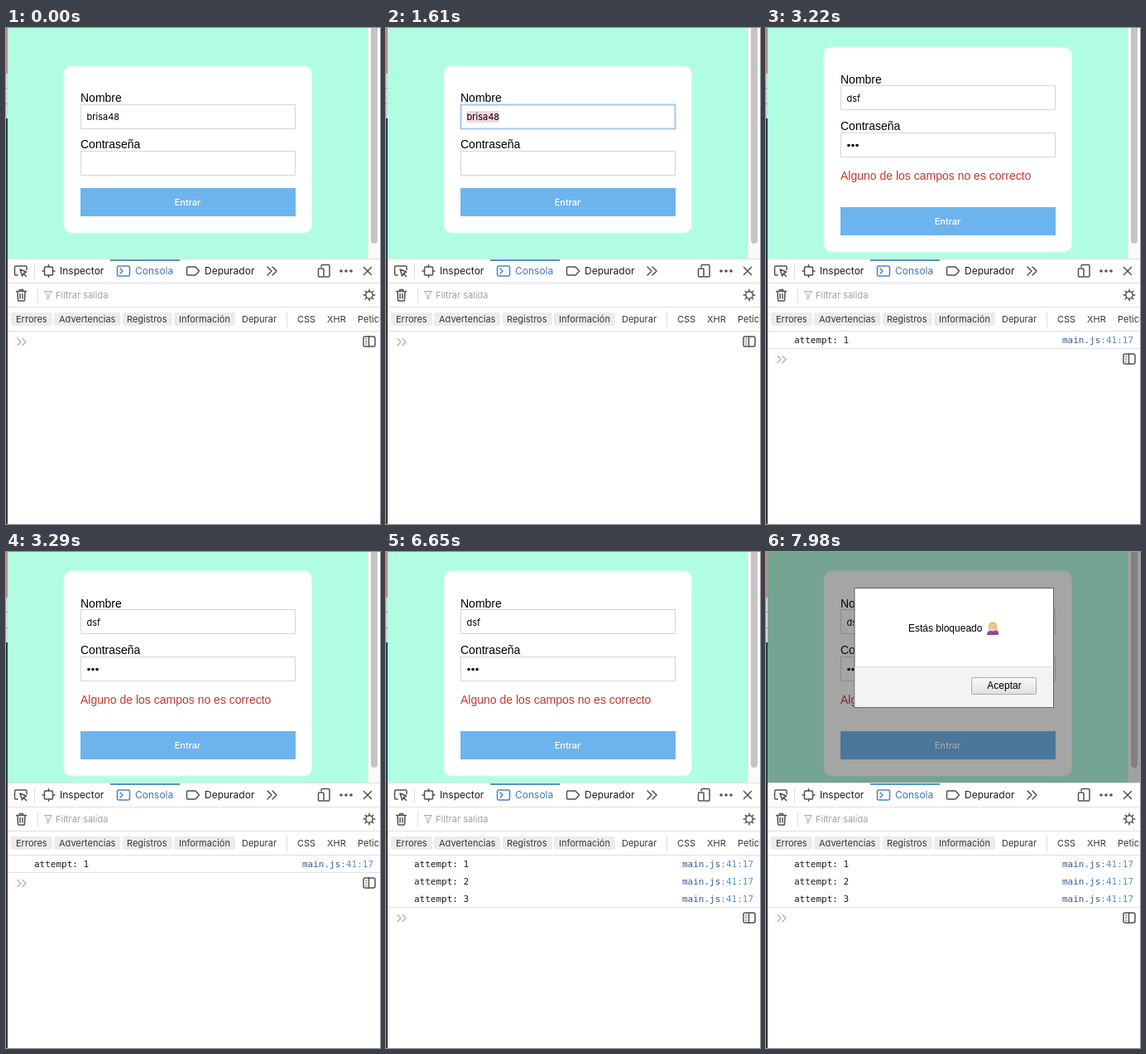
An HTML page that plays this animation: 452x598 px, repeating every 8 s.

```html
<!DOCTYPE html>
<html lang="es">
<head>
<meta charset="utf-8">
<title>Acceso</title>
<style>
  html, body { margin: 0; width: 100%; height: 100%; overflow: hidden; background: #fff; }
  svg { display: block; width: 100vw; height: 100vh; }
  text { white-space: pre; }
  .page { font: 14px "Liberation Sans", Arial, sans-serif; }
  .field { font: 11px Inter, sans-serif; }
  .tab { font: 12px Inter, sans-serif; fill: #1c1c1f; }
  .small { font: 11px Inter, sans-serif; fill: #38383d; }
  .log { font: 11px "DejaVu Sans Mono", monospace; fill: #1c1c1f; }
  .alert { font: 12px "Liberation Sans", Arial, sans-serif; }
  .icon { fill: none; stroke: #505055; stroke-width: 1.5; stroke-linecap: round; stroke-linejoin: round; }
  .rule { fill: #e0e0e2; }
  .input { fill: #fff; stroke: #d6d6d6; }
  .ring { fill: none; stroke: #a6c8ef; stroke-width: 2; }
</style>
</head>
<body>
<svg viewBox="0 0 452 598" preserveAspectRatio="none">
  <defs>
    <linearGradient id="key" x2="0" y2="1">
      <stop stop-color="#fafafa"/><stop offset="1" stop-color="#dedede"/>
    </linearGradient>
  </defs>
  <rect width="452" height="598" fill="#fff"/>

  <!-- login page -->
  <rect width="438" height="278" fill="#b1fde2"/>
  <rect x="437" width="15" height="278" fill="#fafafa"/>
  <rect x="437" width="1" height="278" fill="#e6e6e6"/>
  <rect x="441" y="-8" width="8" height="268" rx="4" fill="#c4c4c4"/>

  <rect id="card" x="70" y="46" width="299.5" height="201" rx="9" fill="#fff" stroke="#d9fbef"/>
  <g id="nameBox">
    <rect class="input" x="90.5" y="92.5" width="259" height="29"/>
    <rect id="nameRing" class="ring" x="90.5" y="92.5" width="259" height="29"/>
  </g>
  <g id="fields">
    <text class="page" x="90" y="89">Nombre</text>
    <rect id="mark" x="97.5" y="100" width="39" height="14" fill="#f7d5e4"/>
    <text id="name" class="field" x="97.5" y="111"></text>
    <text class="page" x="90" y="145">Contraseña</text>
    <rect class="input" x="90.5" y="148.5" width="259" height="29"/>
    <rect id="passRing" class="ring" x="90.5" y="148.5" width="259" height="29"/>
    <g id="dots">
      <circle cx="100" cy="163.5" r="1.8"/>
      <circle cx="105" cy="163.5" r="1.8"/>
      <circle cx="110" cy="163.5" r="1.8"/>
    </g>
    <rect id="caret" width="1" height="14"/>
  </g>
  <text id="error" class="page" x="90" y="183" fill="#c5362c">Alguno de los campos no es correcto</text>
  <g id="button">
    <rect x="90" y="193" width="260" height="34" fill="#6db4ef"/>
    <text class="field" x="219.5" y="214" text-anchor="middle" font-weight="500" style="font-weight:500" fill="#fff">Entrar</text>
  </g>

  <!-- modal alert -->
  <g id="alert">
    <rect width="452" height="278" fill="#141414" fill-opacity=".38"/>
    <rect x="107" y="43.5" width="240.5" height="144" fill="#fff" stroke="#5f6864"/>
    <rect x="107.5" y="138" width="239.5" height="49" fill="#f3f3f3"/>
    <rect x="107.5" y="138" width="239.5" height="1" fill="#dedede"/>
    <text class="alert" x="172" y="96">Estás bloqueado</text>
    <g transform="translate(266 84)">
      <path d="M1 16q0-5 5-5.500h4q5 .5 5 5.500z" fill="#8a4a9c"/>
      <path d="M3 10q-1.500-9.500 5-9.500t5 9.500z" fill="#e6bd4e"/>
      <ellipse cx="8" cy="7" rx="3.600" ry="4.500" fill="#f3cfa9"/>
      <path d="M4 4.500q4-3 8 0l-1-3.500H5z" fill="#e6bd4e"/>
      <path d="M13.500 14.500l-2-7-5-1.500" fill="none" stroke="#e5b58a" stroke-width="2" stroke-linecap="round"/>
      <path d="M13.800 15l-1.300-4" stroke="#8a4a9c" stroke-width="3"/>
    </g>
    <rect x="248.500" y="151.500" width="78" height="20" rx="1" fill="url(#key)" stroke="#ababab"/>
    <text class="alert" x="288" y="165" text-anchor="middle">Aceptar</text>
  </g>

  <!-- developer tools -->
  <rect y="278" width="452" height="320" fill="#fff"/>
  <rect class="rule" y="278" width="452" height="1"/>
  <rect class="rule" y="307" width="452" height="1"/>
  <rect class="rule" y="336" width="452" height="1"/>
  <rect class="rule" y="365" width="452" height="1"/>
  <rect class="rule" x="34" y="284" width="1" height="19"/>
  <rect class="rule" x="38" y="313" width="1" height="19"/>
  <rect class="rule" x="339" y="342" width="1" height="19"/>
  <rect x="126" y="279" width="84" height="2" fill="#5c8fc7"/>

  <g class="icon">
    <path d="M14 298h-2q-1.500 0-1.500-1.500v-8q0-1.500 1.500-1.500h11.500q1.500 0 1.500 1.500v3"/>
    <path d="M17 291l2.500 8 1.700-3 3.300 3.500M17 291l7.500 3-3.300 2" />
    <rect x="46.500" y="288" width="10" height="10" rx="1"/>
    <path d="M51.500 285.500v2.500M51.500 298v2.500M44 293h2.500M56.500 293H59"/>
    <g stroke="#4a82c9">
      <rect x="134.500" y="287" width="15" height="12" rx="2"/>
      <path d="M138 290l3 3-3 3"/>
    </g>
    <path d="M220 288h8q1 0 2 1l3.500 4-3.500 4q-1 1-2 1h-8q-1.500 0-1.500-1.500v-7q0-1.500 1.500-1.500z"/>
    <path d="M316 288l5 5-5 5M322 288l5 5-5 5"/>
    <path d="M381 288v-1q0-1.500 1.500-1.500h7q1.500 0 1.500 1.500v11.500q0 1.500-1.500 1.500H385"/>
    <rect x="377.500" y="290" width="6.500" height="10" rx="1"/>
    <path d="M432.500 288.500l9 9M441.500 288.500l-9 9"/>
    <path d="M12.500 317.500h12M16.500 317v-1.500h4v1.500M14 318l.5 10q0 1 1 1h6q1 0 1-1l.5-10M17 320.500v5.500M20 320.500v5.500"/>
    <path d="M46.500 317.500h9l-3.500 4.500v3.500l-2 1.500v-5z" stroke="#a5a5a9" stroke-width="1"/>
    <circle cx="439" cy="322" r="4.200"/>
    <path id="cogs"/>
  </g>
  <g fill="#505055">
    <circle cx="405" cy="293" r="1.800"/><circle cx="411" cy="293" r="1.800"/><circle cx="417" cy="293" r="1.800"/>
  </g>

  <text class="tab" x="65" y="297">Inspector</text>
  <text class="tab" x="156" y="297" style="fill:#3f78c3">Consola</text>
  <text class="tab" x="240" y="297">Depurador</text>
  <text class="small" x="60" y="326" style="fill:#a3a3a7">Filtrar salida</text>
  <g id="filters"></g>

  <g id="logs"></g>
  <g id="prompt">
    <rect id="logRule" class="rule" y="365" width="452" height="1"/>
    <path class="icon" d="M14 374.500l4 4-4 4M20 374.500l4 4-4 4" style="stroke:#b0b0b4;stroke-width:1.300"/>
    <g class="icon">
      <rect x="432" y="372" width="14" height="12" rx="2"/>
      <path d="M438.500 372v12"/>
      <path d="M434.500 375h1.500M434.500 378h1.500M434.500 381h1.500" stroke-width="1"/>
    </g>
  </g>

  <!-- window edge -->
  <rect width="2" height="55" fill="#b98b7e"/>
  <rect y="55" width="2" height="54" fill="#d3d8da"/>
  <rect y="72" width="2" height="1" fill="#999"/>
  <rect y="91" width="2" height="1" fill="#999"/>
  <rect y="109" width="2" height="169" fill="#23473f"/>
  <rect y="278" width="2" height="320" fill="#3d3535"/>
</svg>

<script>
const LOOP = 8000;
const USER = 'brisa48';
const $ = id => document.getElementById(id);
const show = (id, on) => $(id).style.display = on ? '' : 'none';
const move = (id, y) => $(id).setAttribute('transform', `translate(0 ${y})`);

// Each step: start time and the values that change then.
const steps = [
  [0, { name: USER, focus: '', marked: false, typed: 0, tries: 0, error: false, alert: false }],
  [1470, { focus: 'name' }],
  [1540, { marked: true }],
  [1820, { name: 'd', marked: false }],
  [1890, { name: 'ds' }],
  [1960, { name: 'dsf' }],
  [2170, { focus: 'pass' }],
  [2590, { typed: 1 }],
  [2660, { typed: 2 }],
  [2730, { typed: 3 }],
  [3080, { focus: '' }],
  [3150, { tries: 1, error: true }],
  [4270, { tries: 2 }],
  [5320, { tries: 3 }],
  [6720, { alert: true }]
];

const filters = [
  ['Errores', 12, 6, 50], ['Advertencias', 64, 58, 80], ['Registros', 146, 141, 60],
  ['Información', 209, 203, 74], ['Depurar', 285], ['CSS', 352], ['XHR', 388], ['Peticiones', 425]
];
$('filters').innerHTML = filters.map(([label, x, left, width]) =>
  (width ? `<rect x="${left}" y="343" width="${width}" height="16" rx="2" fill="#ececee"/>` : '') +
  `<text class="small" x="${x}" y="355">${label}</text>`).join('');

$('logs').innerHTML = [1, 2, 3].map(n =>
  `<g id="log${n}"><text class="log" x="34" y="${359 + 21 * n}">attempt: ${n}</text>` +
  `<text class="log" x="358" y="${359 + 21 * n}" style="fill:#3c5a8c">main.js<tspan fill="#5b90bf">:41:17</tspan></text></g>`).join('');

$('cogs').setAttribute('d', Array.from({ length: 8 }, (_, i) => {
  const a = i * Math.PI / 4, c = Math.cos(a), s = Math.sin(a);
  return `M${439 + 5 * c} ${322 + 5 * s}L${439 + 6.8 * c} ${322 + 6.8 * s}`;
}).join(''));

function draw(t) {
  const s = Object.assign({}, ...steps.filter(([at]) => at <= t).map(([, v]) => v));

  $('name').textContent = s.name;
  show('nameRing', s.focus === 'name');
  show('passRing', s.focus === 'pass');
  show('mark', s.marked);
  [...$('dots').children].forEach((dot, i) => dot.style.display = i < s.typed ? '' : 'none');

  show('caret', s.focus && !s.marked);
  const inName = s.focus === 'name';
  $('caret').setAttribute('x', inName ? 98 + $('name').getComputedTextLength() : 98 + 5 * s.typed);
  $('caret').setAttribute('y', inName ? 100 : 156);

  show('error', s.error);
  move('fields', s.error ? -22 : 0);
  move('nameBox', s.error ? -23 : 0);
  move('button', s.error ? 23 : 0);
  $('card').setAttribute('y', s.error ? 23 : 46);
  $('card').setAttribute('height', s.error ? 247 : 201);

  for (const n of [1, 2, 3]) show('log' + n, n <= s.tries);
  move('prompt', 21 * s.tries);
  show('alert', s.alert);
}

const start = performance.now();
function tick(now) {
  draw(Math.max(0, now - start) % LOOP);
  requestAnimationFrame(tick);
}
draw(0);
requestAnimationFrame(tick);
</script>
</body>
</html>
```
